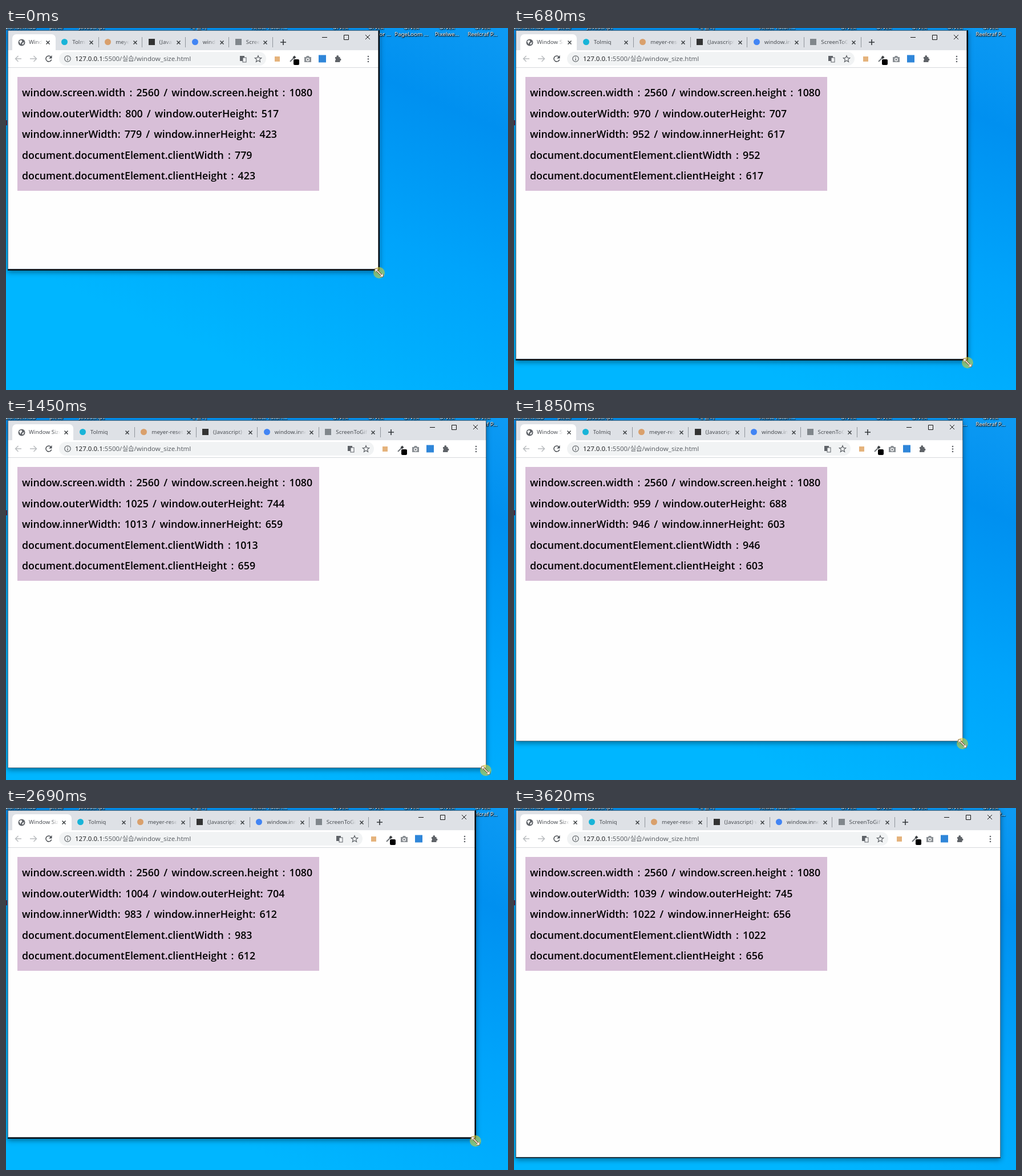
Write an HTML page that moves like this. It is 880 by 636 pixels and loops after 3840 ms.

```html
<!DOCTYPE html>
<html lang="ko">
<head>
<meta charset="utf-8">
<title>Window size</title>
<style>
  html, body { margin: 0; width: 100%; height: 100%; overflow: hidden; }
  body {
    position: relative;
    font-family: "Noto Sans", "Noto Sans CJK KR", "Noto Sans CJK", sans-serif;
    background:
      linear-gradient(168deg, rgba(0, 92, 200, .3), transparent 9%),
      linear-gradient(24deg, #00b6ff 22%, #00a4fb 55%, #0090f0 82%, #0d9af3);
  }
  body *, svg { position: absolute; }
  svg * { position: static; }

  .shortcut {
    width: 76px; top: -7px; margin-left: -38px;
    font-size: 9.8px; line-height: 12px; text-align: center; white-space: pre;
    color: #fff; text-shadow: 0 1px 2px #000, 1px 1px 1px #000;
  }
  .sliver { left: 0; top: 162px; width: 2px; height: 9px; background: #5c2440; }

  #frame { left: 3px; top: 4px; background: #05080a; box-shadow: 0 3px 9px rgba(0, 0, 0, .42); }
  #win { left: 0; top: 0; overflow: hidden; background: #fefefe; }
  #win::after { content: ""; position: absolute; inset: 0; border: 1px solid rgba(0, 30, 55, .6); }
  .strip { left: 0; right: 0; top: 0; height: 35px; background: #dee1e6; }
  .toolbar { left: 0; right: 0; top: 35px; height: 30px; background: #fff; border-bottom: 1px solid #d6d9dc; }
  .address {
    left: 90px; right: 197px; top: 38px; height: 24px; border-radius: 12px;
    background: #f1f3f4; overflow: hidden;
  }
  .address span { left: 28px; font-size: 11.5px; line-height: 24px; white-space: nowrap; color: #5f6368; }
  .address b { position: static; font-weight: 400; color: #202124; }

  #tabs { left: 7.5px; right: 185.5px; top: 7px; height: 28px; display: flex; }
  .tab { position: relative; flex: 1; min-width: 0; }
  .tab:first-child { background: #fff; border-radius: 7px 7px 0 0; }
  .tab:not(:first-child)::after {
    content: ""; position: absolute; right: 0; top: 5px; width: 1px; height: 18px; background: #90959b;
  }
  .tab i { left: 10.5px; top: 8px; width: 11px; height: 11px; }
  .tab svg { left: 10px; top: 7.5px; }
  .tab .close { left: auto; right: 9.5px; top: 10.5px; }
  .tab span {
    left: 29.5px; right: 23px; overflow: hidden; white-space: nowrap;
    font-size: 9.8px; line-height: 27px; color: #4a4e53;
    -webkit-mask-image: linear-gradient(to left, transparent, #000 13px);
    mask-image: linear-gradient(to left, transparent, #000 13px);
  }

  #page {
    left: 17px; top: 82px; width: 529px; height: 200px; background: #d8bfd8;
    font: 600 17.8px/36.5px "Open Sans", "Noto Sans", sans-serif; word-spacing: 2.5px;
    white-space: pre; color: #000;
  }
  #report { left: 8px; top: 9.3px; }
  #cursor { left: -11px; top: -11px; }
</style>
</head>
<body>
<div class="sliver"></div>
<div id="frame">
  <div id="win">
    <div class="strip"></div>
    <div class="toolbar"></div>
    <div class="address"><span><b>127.0.0.1</b>:5500/실습/window_size.html</span></div>
    <div id="tabs"></div>

    <svg style="left:0;top:0" width="120" height="66" viewBox="3 4 120 66" fill="none" stroke-width="1.5">
      <path stroke="#b9bcbf" d="M27 54H17M21.5 49L16.5 54L21.5 59M42 54H53M48.5 49L53.5 54L48.5 59"/>
      <path stroke="#4d5156" d="M78.5 50.5A5 5 0 1 0 79.7 55.5"/>
      <path fill="#4d5156" d="M80.5 48V53.5H75Z"/>
      <circle cx="108" cy="54" r="5.2" stroke="#5f6368" stroke-width="1.2"/>
      <path stroke="#5f6368" stroke-width="1.3" d="M108 53.3V57M108 50.8V52"/>
    </svg>

    <!-- Coordinates run leftwards from the right edge of the window. -->
    <svg style="right:0;top:0" width="260" height="66" viewBox="-260 4 260 66" fill="none">
      <path stroke="#111" d="M-99 16.5H-90M-60.5 12.5H-52.5V20.5H-60.5ZM-23 12L-15 20M-15 12L-23 20"/>
      <path stroke="#33373b" stroke-width="1.6" d="M-172 25H-162M-167 20V30"/>
      <g fill="#5f6368">
        <rect x="-243" y="49" width="8" height="9"/>
        <rect x="-238" y="52" width="6" height="8" fill="#f1f3f4" stroke="#5f6368"/>
        <circle cx="-18" cy="50" r="1.3"/><circle cx="-18" cy="54.5" r="1.3"/><circle cx="-18" cy="59" r="1.3"/>
        <path d="M-76 51H-73.5A2 2 0 1 1 -70 51H-67.5V53.5A2 2 0 1 1 -67.5 57.5V60H-76V57A2 2 0 0 0 -76 53.5Z"/>
      </g>
      <path stroke="#5f6368" stroke-width="1.2" d="M-211 48.5L-209.4 52.4L-205.3 52.7L-208.4 55.4L-207.4 59.5L-211 57.3L-214.6 59.5L-213.6 55.4L-216.7 52.7L-212.6 52.4Z"/>
      <rect x="-182" y="50" width="9" height="9" fill="#e5b37c"/>
      <path stroke="#70757a" stroke-width="2" d="M-155 59L-148 52"/>
      <path stroke="#3c4043" stroke-width="4" d="M-149 53L-146 50"/>
      <rect x="-149" y="55" width="10" height="10" rx="2" fill="#000"/>
      <path fill="#8a8f94" d="M-130 51H-127L-126 49H-122L-121 51H-118V60H-130Z"/>
      <circle cx="-124" cy="55.5" r="2.4" stroke="#fff" stroke-width="1.2"/>
      <rect x="-105" y="47.5" width="13" height="13" fill="#2f86d9"/>
    </svg>

    <div id="page"><div id="report"></div></div>
  </div>
</div>

<svg id="cursor" width="22" height="22" viewBox="-11 -11 22 22" fill="none">
  <circle r="10" fill="rgba(225,210,40,.56)"/>
  <path stroke="#7a4a22" stroke-width="3.2" d="M-6 -2V-6H-2M6 2V6H2M-6 -6L6 6"/>
  <path stroke="#fff" stroke-width="1.5" d="M-6 -2V-6H-2M6 2V6H2M-6 -6L6 6"/>
</svg>

<script>
const $ = id => document.getElementById(id);
const LOOP = 3840, STEP = 76.7, LAST_STEP = 47;
const LEFT = 3, TOP = 4, PAGE_TOP = 69;
const ZOOM = 1.2036;       // reported pixels per drawn pixel
const LAG = .25;           // steps by which the page trails the dragged frame

// Turning points of the drag: step, right edge, bottom edge
const DRAG = [
  [0, 655, 426], [5, 740, 529], [7, 779, 568], [13, 831, 616],
  [15, 853, 624], [18, 853, 624], [24, 787, 568], [28, 746, 513],
  [30, 754, 519], [35, 824, 581], [39, 850, 603], [43, 853, 615]
];

const SHORTCUTS = {
  0: "Zonder.hub", 1: "piece", 2: "JavaScript", 5: "새 폴더", 7: "React Tutori...",
  9: "Orvex", 10: "Orvex\nVectorlor ...", 11: "Orvex\nPageLoom ...",
  12: "Orvex\nPixelwe...", 13: "Orvex\nReelcraf P..."
};

const GLOBE = `<svg width="13" height="13" viewBox="-6.5 -6.5 13 13"><circle r="6" fill="#5f6368"/>
  <path fill="#fff" d="M-4.5 -2L-1 -4.5L1 -2L-1 0L-2 3ZM1 1L4.5 -1L3 3L1 4Z"/></svg>`;
const CLOSE = `<svg class="close" width="7" height="7"><path d="M.5 .5L6.5 6.5M6.5 .5L.5 6.5" stroke="#3c4043" stroke-width="1.5"/></svg>`;
const badge = (color, radius) => `<i style="background:${color};border-radius:${radius}"></i>`;
const TABS = [
  ["Window Size", GLOBE],
  ["Tolmiq", badge("#18b4d8", "50%")],
  ["meyer-reset", badge("#d9a06c", "50%")],
  ["(Javascript) window", badge("#333", "0")],
  ["window.innerWidth", badge("#4285f4", "50%")],
  ["ScreenToGif", badge("#80868b", "0")]
];

for (const [column, label] of Object.entries(SHORTCUTS)) {
  const el = document.createElement("div");
  el.className = "shortcut";
  el.style.left = 26 + 62.25 * column + "px";
  el.textContent = label;
  document.body.prepend(el);
}
$("tabs").innerHTML = TABS.map(([title, icon]) =>
  `<div class="tab">${icon}<span>${title}</span>${CLOSE}</div>`).join("");

function edgesAt(step) {
  const next = Math.max(1, DRAG.findIndex(key => key[0] >= step));
  const from = DRAG[next - 1], to = DRAG[next];
  const p = (step - from[0]) / (to[0] - from[0]);
  return [1, 2].map(i => from[i] + (to[i] - from[i]) * p);
}

const pageSize = ([right, bottom]) =>
  [(right - LEFT) * ZOOM, (bottom - PAGE_TOP) * ZOOM].map(Math.floor);

function resize(el, right, bottom) {
  el.style.width = right - LEFT + "px";
  el.style.height = bottom - TOP + "px";
}

function draw(step) {
  const dragStep = Math.min(step, DRAG.at(-1)[0]);
  const edges = edgesAt(dragStep), trailing = edgesAt(dragStep - LAG);
  const [right, bottom] = edges.map(Math.round);
  // A growing frame shows a strip that the page has not painted yet.
  const gap = edges.map((edge, i) => Math.max(0, Math.min(2, Math.round(edge - trailing[i]))));
  const [outerW, outerH] = pageSize(edges);
  const [innerW, innerH] = pageSize(trailing);

  resize($("frame"), right, bottom);
  resize($("win"), right - gap[0], bottom - gap[1]);
  $("report").textContent = [
    "window.screen.width : 2560 / window.screen.height : 1080",
    `window.outerWidth: ${outerW + 16} / window.outerHeight: ${outerH + 88}`,
    `window.innerWidth: ${innerW} / window.innerHeight: ${innerH}`,
    `document.documentElement.clientWidth : ${innerW}`,
    `document.documentElement.clientHeight : ${innerH}`
  ].join("\n");
  $("cursor").style.transform = `translate(${right - 1}px, ${bottom + 4}px)`;
  $("cursor").style.opacity = Math.min(1, (LAST_STEP - step) / 3);
}

let shown = -1;
function tick() {
  const step = Math.min(LAST_STEP, Math.floor((performance.now() % LOOP + 11) / STEP));
  if (step !== shown) draw(shown = step);
  requestAnimationFrame(tick);
}
tick();
</script>
</body>
</html>
```
